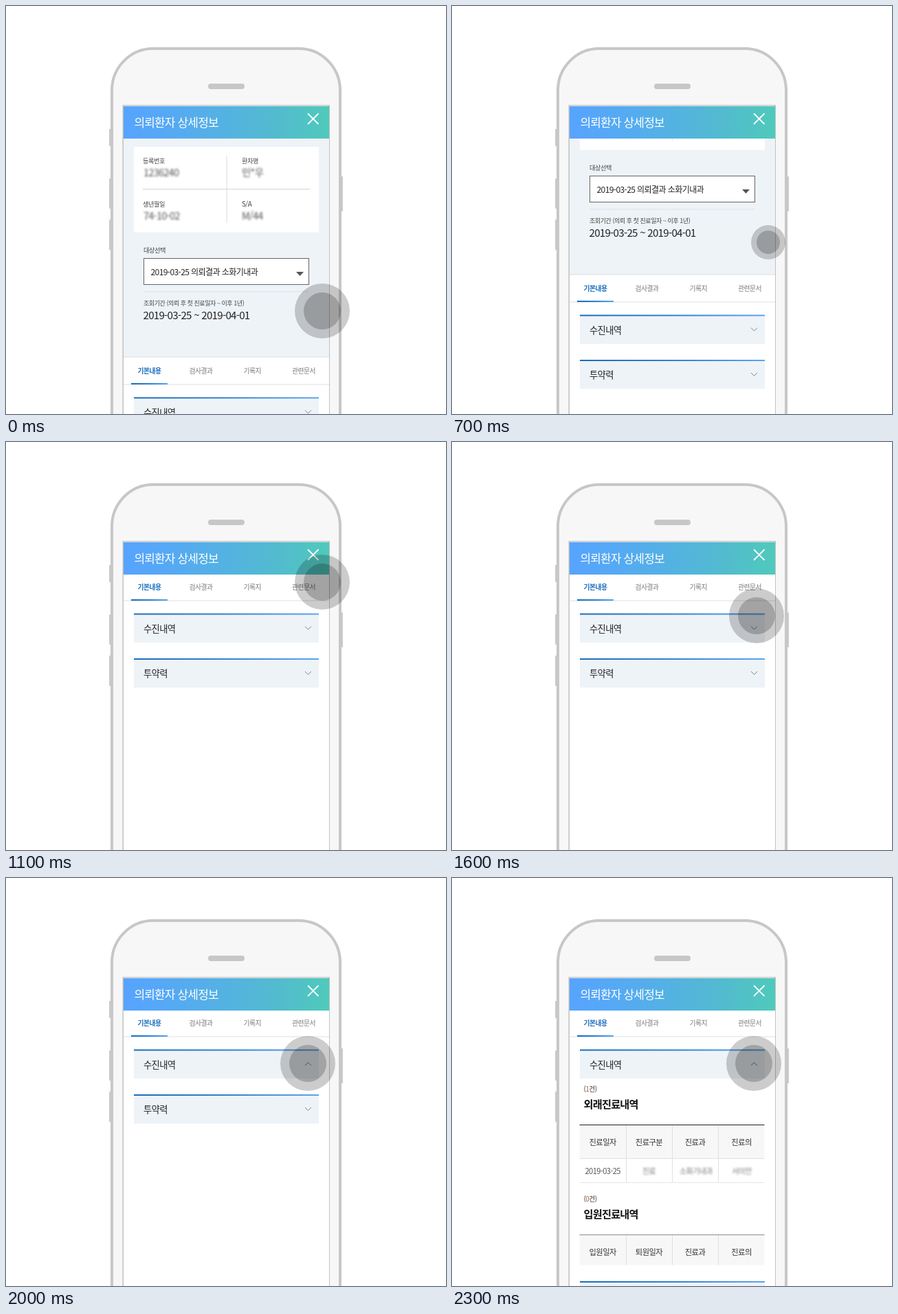
An HTML page that plays this animation: 640x594 px, repeating every 3800 ms.

```html
<!DOCTYPE html>
<html lang="ko">
<head>
<meta charset="utf-8">
<style>
  html, body { margin: 0; width: 100%; height: 100%; overflow: hidden; background: #fff; }
  svg { display: block; }
  text { font-family: "Noto Sans CJK KR", "Noto Sans CJK", "Noto Sans CJK JP", sans-serif; letter-spacing: -.05em; white-space: pre; }
  .blurred { filter: blur(1.7px); }
</style>
</head>
<body>
<svg id="stage" width="640" height="594" viewBox="0 0 640 594"></svg>
<script>
const LOOP = 3800;
const PALE = '#eef3f8', LINE = '#dcdfe2', FRAME = '#c7c7c7';

const rect = (x, y, w, h, fill, extra = '') =>
  `<rect x="${x}" y="${y}" width="${w}" height="${h}" fill="${fill}" ${extra}/>`;
const text = (x, y, size, content, fill = '#333', extra = '') =>
  `<text x="${x}" y="${y}" font-size="${size}" fill="${fill}" ${extra}>${content}</text>`;
const bold = 'font-weight="700"', medium = 'font-weight="500"', blurred = 'class="blurred"';

const gradient = (id, ...colors) => `<linearGradient id="${id}">${colors.map((color, i) =>
  `<stop offset="${i / (colors.length - 1)}" stop-color="${color}"/>`).join('')}</linearGradient>`;

const phone = () => `
  ${[[179, 25], [251, 44], [311, 44]].map(([y, h]) => rect(150, y, 4, h, '#cbcbcb', 'rx="1"')).join('')}
  ${rect(486, 248, 4, 51, '#cbcbcb', 'rx="1"')}
  <path d="M154 600V123A60 61 0 0 1 214 62H426A60 61 0 0 1 486 123V600" fill="#f7f7f7" stroke="${FRAME}" stroke-width="4"/>
  ${rect(294, 113, 53, 8, FRAME, 'rx="4"')}
  ${rect(170.25, 144.75, 300, 500, '#fff', 'stroke="#bfc1c2" stroke-width="1.5"')}`;

const header = () => `
  ${rect(171, 146, 299, 47, 'url(#head)')}
  ${text(186.5, 175.5, 17, '의뢰환자 상세정보', '#fff')}
  <path d="M439 156.5l15.5 15.5M454.5 156.5l-15.5 15.5" stroke="#fff" stroke-width="1.8"/>`;

const patient = () => `
  ${rect(171, 193, 299, 318, PALE)}
  ${rect(186, 205, 269, 124.5, '#fff')}
  ${rect(199, 266, 243, 1.3, '#dbdbdb')}
  ${rect(320.5, 218, 1, 98, '#dbdbdb')}
  ${text(199, 228.5, 9.2, '등록번호', '#444')}
  ${text(343, 228.5, 9.2, '환자명', '#444')}
  ${text(199, 291.5, 9.2, '생년월일', '#444')}
  ${text(343, 291.5, 9.8, 'S/A', '#444')}
  ${text(200, 248, 14.5, '1236240', '#555', blurred)}
  ${text(343, 248, 14.5, '민*우', '#555', blurred)}
  ${text(200, 311, 14.5, '74-10-02', '#555', blurred)}
  ${text(343, 311, 14.5, 'M/44', '#555', blurred)}`;

const query = () => `
  ${text(200, 359, 9.2, '대상선택', '#444')}
  ${rect(200.5, 367.5, 240, 38, '#fff', 'stroke="#666"')}
  ${text(210.5, 391.5, 12.05, '2019-03-25 의뢰결과 소화기내과', '#222')}
  <path d="M422 387h11l-5.5 6z" fill="#555"/>
  ${rect(200, 415.5, 240, 1, '#dbe2e8')}
  ${text(200, 436, 9, '조회기간 (의뢰 후 첫 진료일자 ~ 이후 1년)', '#444')}
  ${text(199.5, 456, 15.15, '2019-03-25 ~ 2019-04-01', '#222')}`;

const tabs = () => `
  ${rect(171, 511, 299, 900, '#fff')}
  ${rect(171, 510.5, 299, 1, LINE)}
  ${rect(171, 550.5, 299, 1, LINE)}
  ${text(191.5, 534.5, 9.8, '기본내용', '#1b6fbd', bold)}
  ${[[266.5, '검사결과'], [345.5, '기록지'], [416, '관련문서']].map(([x, label]) =>
    text(x, 534.5, 9.8, label, '#777', medium)).join('')}
  ${rect(182, 549, 53, 2, 'url(#bar)')}`;

// Coordinates from here down are relative to the page scrolled to its end.
const section = (y, title, id) => `
  ${rect(186, y, 269, 42, PALE)}
  ${rect(186, y - .5, 269, 2, 'url(#bar)')}
  ${text(200, y + 26.5, 13.3, title, '#222')}
  <path id="${id}" d="M435 ${y + 18.5}l4.5 4.5 4.5-4.5" fill="none" stroke="#7d8287"/>`;

const table = (y, count, title, heads, rule, bodyHeight) => `
  ${text(191.5, y - 48.5, 9.8, `(<tspan fill="#b9532d">${count}</tspan>건)`, '#333', medium)}
  ${text(191.5, y - 24.5, 15.2, title, '#111', bold)}
  ${rect(185.5, y, 269, 49, '#f7f7f7')}
  ${rect(185.5, y + 49, 269, 1, '#e0e0e0')}
  ${bodyHeight ? rect(185.5, y + 49 + bodyHeight, 269, 1, '#e6e6e6') : ''}
  ${[253, 320, 387].map(x => rect(x, y, 1, 49 + bodyHeight, '#e0e0e0')).join('')}
  ${rect(185.5, y, 269, 1, rule)}
  ${heads.map((head, i) =>
    text([219.2, 286.5, 353.5, 421][i], y + 29.5, 11.3, head, '#333', medium + ' text-anchor="middle"')).join('')}`;

const records = () => `
  ${table(359, 1, '외래진료내역', ['진료일자', '진료구분', '진료과', '진료의'], '#222', 35)}
  ${text(193.5, 431, 11.1, '2019-03-25', '#555')}
  ${text(277, 431, 11, '진료', '#777', blurred)}
  ${text(331, 431, 11, '소화기내과', '#777', blurred)}
  ${text(407, 431, 11, '서이안', '#777', blurred)}
  ${table(519, 0, '입원진료내역', ['입원일자', '퇴원일자', '진료과', '진료의'], '#8c8c8c', 0)}`;

const stage = document.getElementById('stage');
stage.innerHTML = `
  <defs>
    ${gradient('head', '#57a3ff', '#55aaf2', '#54b2e2', '#52bbce', '#4fcabb')}
    ${gradient('bar', '#1a6db8', '#2f82d0', '#5ba5ee')}
    <clipPath id="screen">${rect(171, 193, 299, 401, '#000')}</clipPath>
    <clipPath id="drawer"><rect id="opening" x="171" y="291.5" width="299" height="0"/></clipPath>
  </defs>
  ${phone()}
  <g clip-path="url(#screen)"><g id="page">
    ${patient()}${query()}${tabs()}
    <g transform="translate(0 320)">
      ${section(250, '수진내역', 'chevron')}
      <g clip-path="url(#drawer)">${records()}</g>
      <g id="second">${section(315.5, '투약력', 'chevron2')}</g>
    </g>
  </g></g>
  ${header()}
  <g id="touch" fill-opacity=".2"><circle id="halo"/><circle id="core"/></g>`;

// Each pose holds until the next one begins.
const poses = [
  { at: 0, scroll: 0, x: 460, y: 444, big: true, open: 0 },
  { at: 500, big: false },
  { at: 700, scroll: 120, y: 344 },
  { at: 800, scroll: 240, y: 244 },
  { at: 900, scroll: 320, y: 204 },
  { at: 1100, big: true },
  { at: 1600, x: 443, y: 253 },
  { at: 1700, x: 440, y: 266 },
  { at: 1800, x: 439, y: 270 },
  { at: 2000, flipped: true },
  { at: 2100, open: 91 },
  { at: 2200, open: 181 },
  { at: 2300, open: 272 },
];

const part = id => document.getElementById(id);
const set = (id, name, value) => part(id).setAttribute(name, value);

function draw(time) {
  const pose = Object.assign({}, ...poses.filter(p => p.at <= time));
  set('page', 'transform', `translate(0 ${-pose.scroll})`);
  set('touch', 'transform', `translate(${pose.x} ${pose.y})`);
  set('halo', 'r', pose.big ? 40 : 25);
  set('core', 'r', pose.big ? 27 : 17);
  set('opening', 'height', pose.open);
  set('second', 'transform', `translate(0 ${pose.open})`);
  set('chevron', 'd', pose.flipped ? 'M435 273l4.5-4.5 4.5 4.5' : 'M435 268.5l4.5 4.5 4.5-4.5');
}

const start = performance.now();
function tick() {
  draw((performance.now() - start) % LOOP);
  requestAnimationFrame(tick);
}
tick();
</script>
</body>
</html>
```
